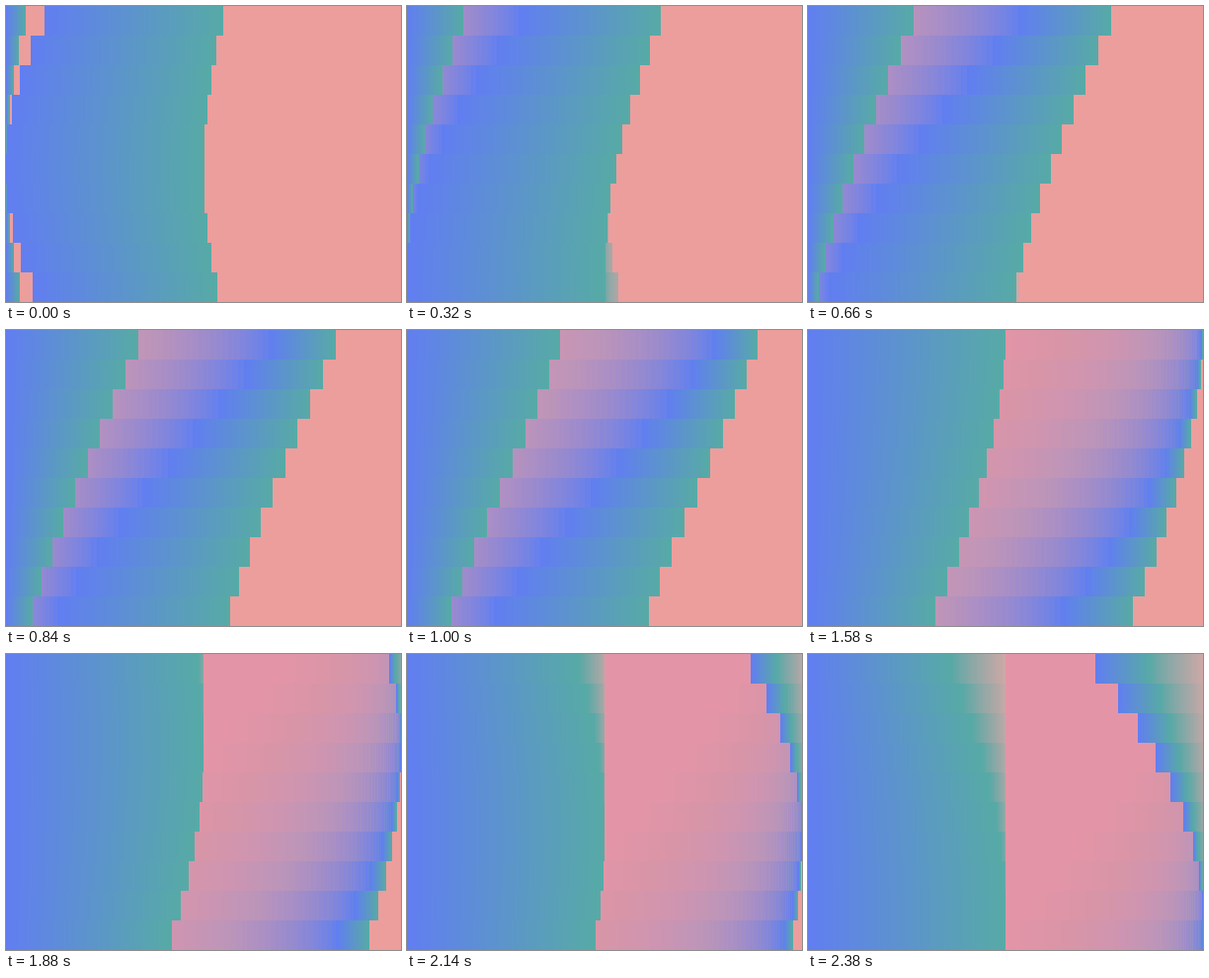
Animation of 400x300 px, one loop 2.4 s. Source, as an HTML page with a canvas:

```html
<!DOCTYPE html>
<html lang="en">
<head>
<meta charset="utf-8">
<title>Swaying gradient bands</title>
<style>
  html, body { margin: 0; width: 100%; height: 100%; overflow: hidden; background: rgb(236, 158, 157); }
  canvas { display: block; width: 400px; height: 300px; image-rendering: pixelated; }
</style>
</head>
<body>
<canvas id="stage" width="400" height="10"></canvas>
<script>
const LOOP = 2400, STEP = 20;
const WIDTH = 400, ROWS = 10, HALF = WIDTH / 2;
const PINK = [236, 158, 157], BLUE = [97, 126, 241], GREEN = [87, 170, 166];
const FADE = 0.05, START = 0.642, SPEED = 0.0302, ROW_LAG = 0.13;

const ctx = document.getElementById('stage').getContext('2d');
const image = ctx.createImageData(WIDTH, ROWS);
const px = image.data;
let done = -1;

function clear() {
  for (let i = 0; i < px.length; i += 4) px.set([...PINK, 255], i);
  done = -1;
}

// Whole-number fading leaves a faint tint behind for good.
function fade() {
  for (let i = 0; i < px.length; i += 4) {
    for (let c = 0; c < 3; c++) px[i + c] += Math.round((PINK[c] - px[i + c]) * FADE);
  }
}

function panel(row, left, right) {
  const end = Math.min(WIDTH, Math.ceil(right));
  for (let x = Math.floor(left); x < end; x++) {
    const k = Math.min(1, Math.max(0, (x + 0.5 - left) / (right - left)));
    const i = (row * WIDTH + x) * 4;
    for (let c = 0; c < 3; c++) px[i + c] = Math.round(BLUE[c] + (GREEN[c] - BLUE[c]) * k);
  }
}

function advance() {
  done++;
  fade();
  for (let row = 0; row < ROWS; row++) {
    const angle = START + SPEED * done - ROW_LAG * row;
    const w = HALF * (1 - Math.cos(angle)) / 2;
    panel(row, 0, w);
    panel(row, 2 * w, HALF + w);
  }
}

// Trails build up from the loop's start, so each picture follows from the time alone.
function show(now) {
  const t = Math.max(0, now - begin + 0.001) % LOOP;
  const step = Math.floor(t / STEP);
  if (step < done) clear();
  while (done < step) advance();
  ctx.putImageData(image, 0, 0);
  requestAnimationFrame(show);
}

const begin = performance.now();
clear();
show(begin);
</script>
</body>
</html>
```
